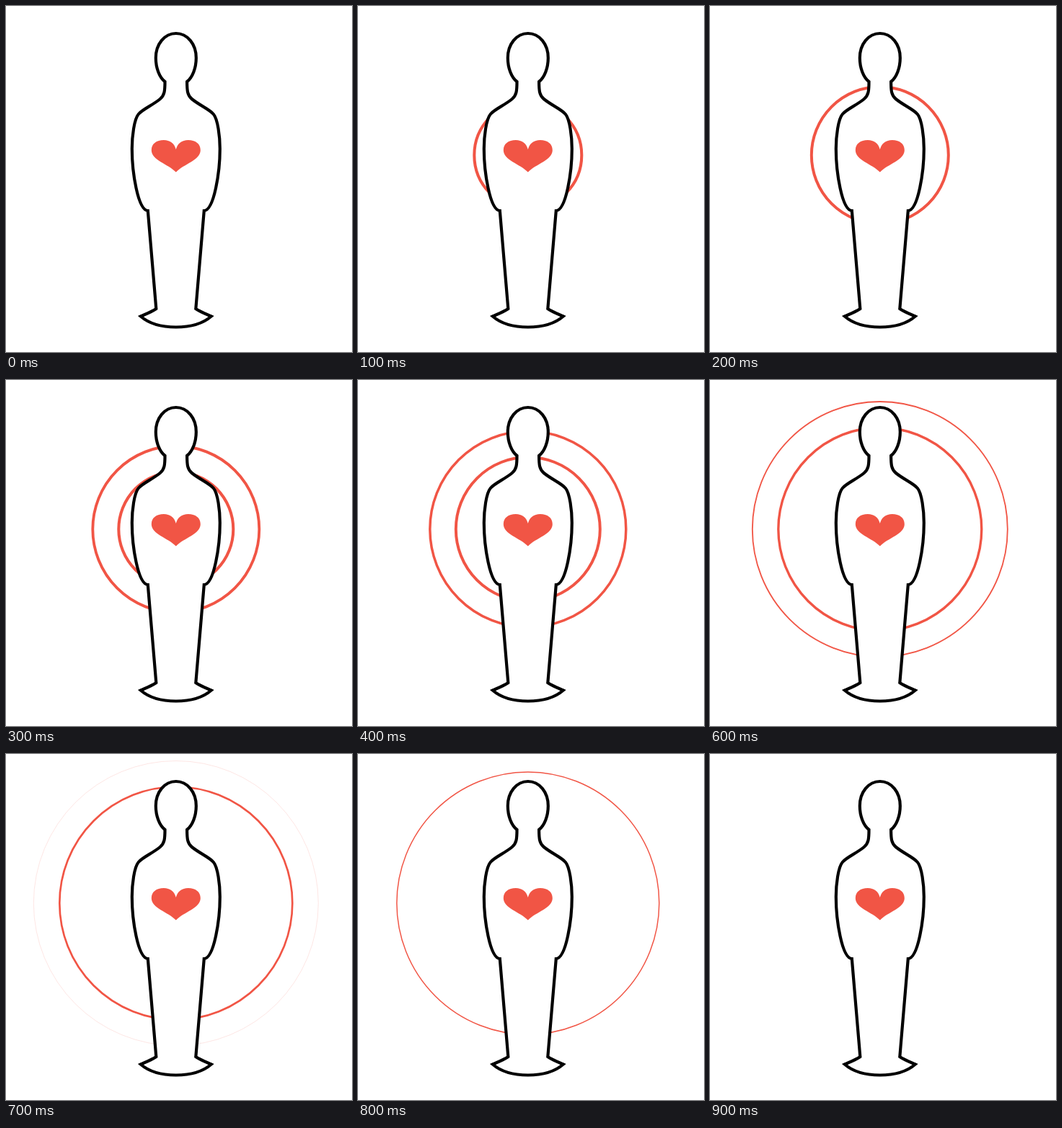
Recreate the animation shown at these times as an HTML page. Size 480 by 480 pixels, loop 1300 ms.

```html
<!DOCTYPE html>
<html lang="en">
<head>
<meta charset="utf-8">
<title>Heart pulse</title>
<style>
  html, body { margin: 0; height: 100%; overflow: hidden; background: #fff; }
  svg { display: block; width: 100%; height: 100%; }
</style>
</head>
<body>
<svg viewBox="0 0 480 480">
  <g transform="translate(235.8)">
    <g fill="none" stroke="#f15545">
      <circle class="ring" cy="207"/>
      <circle class="ring" cy="207"/>
    </g>
    <path fill="#fff" stroke="#000" stroke-width="4.2" stroke-miterlimit="10" d="M0 38
      C-16 38 -28 53 -28 72 C-28 86 -23 99 -15.3 105
      C-15.3 118 -16 124 -22 129 C-33 138 -46 143 -52 150
      C-58 157 -61 181 -61 198 C-61 230 -53 283 -39 284
      L-27.5 420 C-33 424 -41 427 -49 430.5 C-38 440 -20 445.5 0 445.5
      C20 445.5 38 440 49 430.5 C41 427 33 424 27.5 420
      L39 284 C53 283 61 230 61 198 C61 181 58 157 52 150
      C46 143 33 138 22 129 C16 124 15.3 118 15.3 105
      C23 99 28 86 28 72 C28 53 16 38 0 38Z"/>
    <path fill="#f15545" d="M0 199
      C2 191 8 186 17 186 C27 186 34 191 34 200 C34 214 11 219 0 230.5
      C-11 219 -34 214 -34 200 C-34 191 -27 186 -17 186 C-8 186 -2 191 0 199Z"/>
  </g>
</svg>
<script>
  const LOOP = 1300, STEP = 50, MAX_R = 199;
  const rings = document.querySelectorAll('.ring');

  // Rings grow steadily and thin out towards the largest radius.
  function drawRing(ring, r) {
    const width = 4.1 * (1 - (r / MAX_R) ** 5);
    const visible = r > 0 && width > 0;
    ring.setAttribute('r', visible ? r : 0);
    ring.setAttribute('stroke-width', visible ? width : 0);
  }

  function frame(now) {
    const t = Math.floor(now % LOOP / STEP) * STEP;
    const r = 54 + 0.205 * t;
    drawRing(rings[0], r);
    drawRing(rings[1], r - 36);
    requestAnimationFrame(frame);
  }
  requestAnimationFrame(frame);
</script>
</body>
</html>
```
